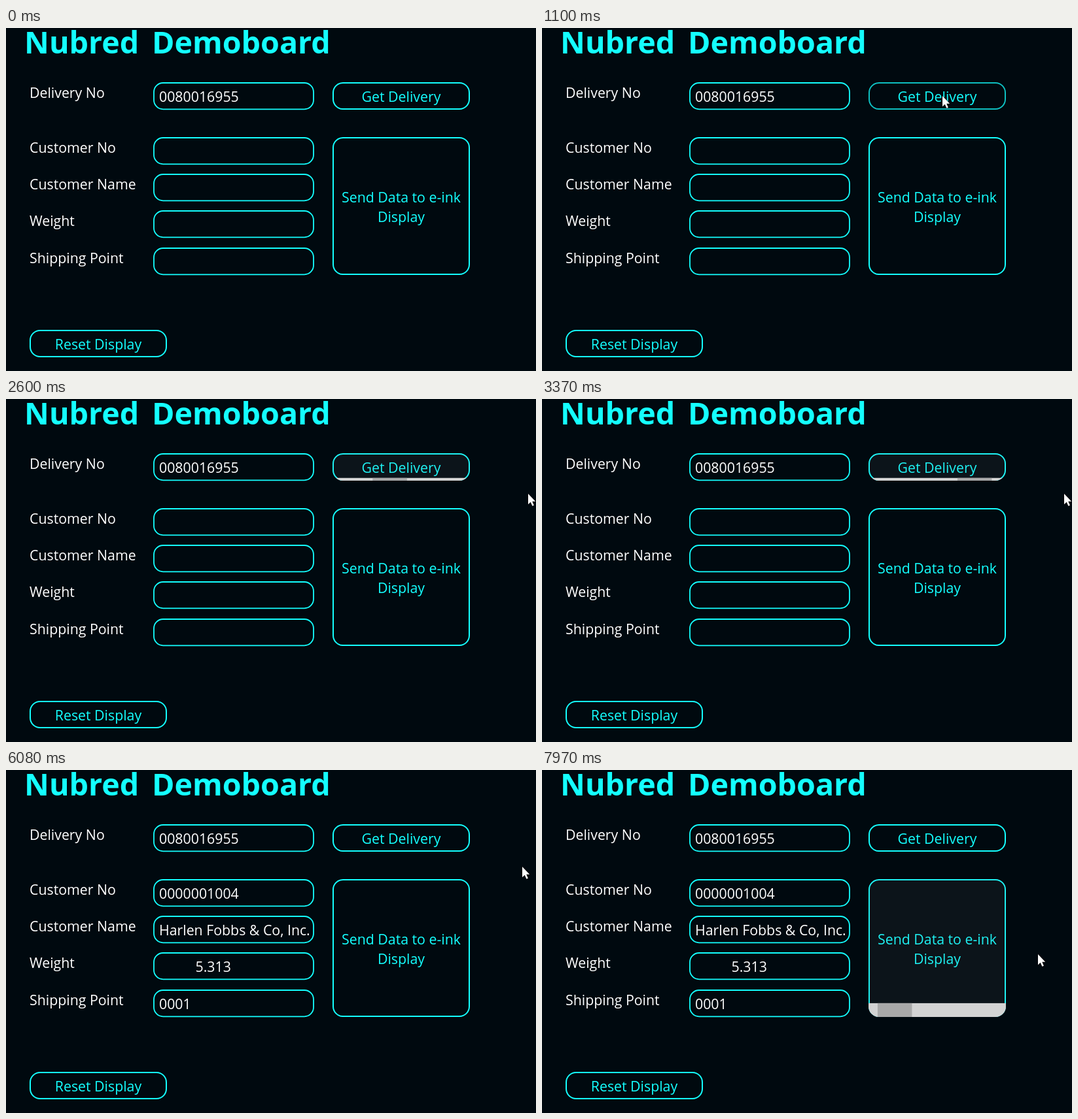
Write an HTML page that moves like this. It is 810x525 px and loops after 8 s.

```html
<!DOCTYPE html>
<html lang="en">
<head>
<meta charset="utf-8">
<title>Delivery demo</title>
<style>
  html, body { margin: 0; width: 100%; height: 100%; overflow: hidden; background: #00090f; }
  svg { display: block; width: 810px; height: 525px; font: 21.3px "Open Sans", "Noto Sans", sans-serif; fill: #fff; }
  .title { font-size: 46.6px; font-weight: 700; fill: #14ffff; }
  .field { fill: none; stroke: #14ffff; stroke-width: 1.8; }
  .button { fill: none; stroke: #14ffff; stroke-width: 2; }
  .caption { fill: #14ffff; text-anchor: middle; }
</style>
</head>
<body>
<svg id="stage" viewBox="0 0 810 525">
  <text class="title" x="28" y="38.5">Nubred</text>
  <text class="title" x="223" y="38.5">Demoboard</text>
</svg>
<script>
const LOOP = 8000;
const stage = document.getElementById('stage');

function add(parent, tag, attributes, text = '') {
  const node = document.createElementNS('http://www.w3.org/2000/svg', tag);
  for (const name in attributes) node.setAttribute(name, attributes[name]);
  node.textContent = text;
  return parent.appendChild(node);
}

const show = (node, visible) => node.setAttribute('visibility', visible ? 'visible' : 'hidden');

// Form rows: label, top of the box, value, time the value arrives, value x
const valueClip = add(stage, 'clipPath', { id: 'values' });
add(valueClip, 'rect', { x: 232, y: 80, width: 231, height: 300 });

const rows = [
  ['Delivery No', 84, '0080016955', 0, 234],
  ['Customer No', 168, '0000001004', 3580, 234],
  ['Customer Name', 224, 'Harlen Fobbs & Co, Inc.', 4750, 234],
  ['Weight', 280, '5.313', 3580, 289.5],
  ['Shipping Point', 337, '0001', 3580, 234],
].map(([label, y, value, time, x]) => {
  add(stage, 'text', { x: 36, y: y + 23.3 }, label);
  add(stage, 'rect', { class: 'field', x: 226, y, width: 244, height: 40.3, rx: 14 });
  const node = add(stage, 'text', { x, y: y + 29, 'clip-path': 'url(#values)' }, value);
  return { node, time };
});

// Button with a busy layer whose segment slides along the bottom edge
function makeButton(id, x, y, height, lines) {
  const width = 210;
  const border = add(stage, 'rect', {
    class: 'button', x: x + 1, y: y + 1, width: width - 2, height: height - 2, rx: 15 });
  lines.forEach(([text, baseline]) =>
    add(stage, 'text', { class: 'caption', x: x + width / 2, y: baseline }, text));

  const clip = add(stage, 'clipPath', { id });
  add(clip, 'rect', { x, y, width, height, rx: 16 });
  const busy = add(stage, 'g', { 'clip-path': `url(#${id})`, visibility: 'hidden' });
  const barHeight = height / 10, barY = y + height - barHeight;
  add(busy, 'rect', { x, y, width, height, fill: 'rgba(120,120,130,.1)' });
  add(busy, 'rect', { x, y: barY, width, height: barHeight, fill: '#d3d3d3' });
  const segment = add(busy, 'rect', { y: barY, width: width / 4, height: barHeight, fill: '#a9a9a9' });
  const contains = p => p.x >= x && p.x <= x + width && p.y >= y && p.y <= y + height;
  return { x, border, busy, segment, contains };
}

const getButton = makeButton('get', 499, 83, 42, [['Get Delivery', 113]]);
const sendButton = makeButton('send', 499, 167, 211, [['Send Data to e-ink', 267], ['Display', 297]]);
makeButton('reset', 36, 462, 42, [['Reset Display', 492]]);

const clickDot = add(stage, 'circle', { r: 12, fill: '#ff0', 'fill-opacity': .5 });
const cursor = add(stage, 'path', {
  d: 'M0 0V16.2L3.7 12.8L6.4 18.8L8.9 17.7L6.3 11.8H11.2Z',
  stroke: '#000', 'stroke-width': 1, 'paint-order': 'stroke' });

const STEP = 70;
const easeOut = p => p * (2 - p);
const smooth = p => p * p * (3 - 2 * p);

// Cursor moves: start, end, from, to, easing
const moves = [
  [330, 1100, [776, 504], [612, 104], easeOut],
  [1710, 2270, [612, 104], [798, 145], smooth],
  [6080, 6570, [789, 148], [630, 278], smooth],
  [7430, 7920, [630, 278], [758, 282], smooth],
];

function cursorAt(time) {
  const [start, end, from, to, ease] = moves.filter(m => m[0] <= time).pop() || moves[0];
  const stepped = Math.floor((time - start) / STEP) * STEP;
  const p = ease(Math.min(1, Math.max(0, stepped / (end - start))));
  return { x: from[0] + (to[0] - from[0]) * p, y: from[1] + (to[1] - from[1]) * p };
}

function updateButton(button, time, point, busyFrom, busyTo, pressed) {
  const hovered = time >= 330 && button.contains(point);
  button.border.setAttribute('stroke-opacity', !hovered ? 1 : pressed ? .56 : .74);
  show(button.busy, time >= busyFrom && time < busyTo);
  // The page stalls for a moment while the first response is processed
  const clock = time >= 3650 && time < 4000 ? 3650 : time;
  const phase = Math.max(0, clock - busyFrom) / 1030 % 2;
  button.segment.setAttribute('x', button.x + 157.5 * (1 - Math.abs(1 - phase)));
}

function draw(time) {
  const point = cursorAt(time);
  const firstClick = time >= 1580 && time < 1710;
  const secondClick = time >= 7300 && time < 7430;

  rows.forEach(row => show(row.node, time >= row.time));
  updateButton(getButton, time, point, 2200, 4750, firstClick);
  updateButton(sendButton, time, point, 7880, LOOP, secondClick);

  const place = `translate(${point.x} ${point.y})`;
  cursor.setAttribute('transform', place);
  clickDot.setAttribute('transform', place);
  show(cursor, time >= 330);
  show(clickDot, firstClick || secondClick);
}

const begin = performance.now();
function frame() {
  draw((performance.now() - begin) % LOOP);
  requestAnimationFrame(frame);
}
frame();
</script>
</body>
</html>
```
